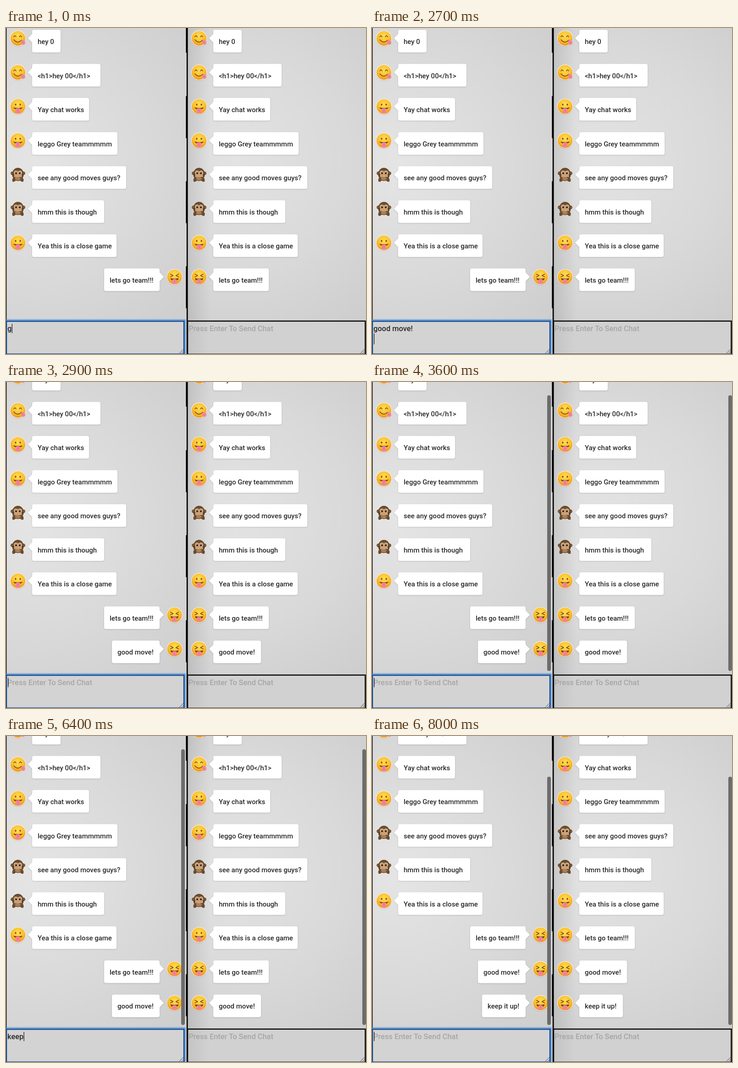
These frames come from a looping animation (785 px wide and 713 px high, 8.1 s). An HTML page:

```html
<!DOCTYPE html>
<html lang="en">
<head>
<meta charset="utf-8">
<title>Team chat</title>
<style>
  html, body { margin: 0; width: 100%; height: 100%; overflow: hidden; background: #d4d4d4; }
  svg { display: block; }
  text { font: 500 15px Roboto, sans-serif; fill: #2a2a2a; white-space: pre; }
  .field { font-size: 16.4px; }
  .hint { fill: #a6a6a6; }
  .bubble { fill: #fff; filter: drop-shadow(0 1px 1.5px rgba(0, 0, 0, .16)); }
  .bar { fill: #6c6c6c; }
  .line { fill: none; stroke: #6b3d0c; stroke-width: 1.4; stroke-linecap: round; stroke-linejoin: round; }
</style>
</head>
<body>
<svg width="785" height="713" viewBox="0 0 785 713">
  <defs>
    <radialGradient id="leftLight" gradientUnits="userSpaceOnUse" cx="60" cy="300" r="470">
      <stop offset="0" stop-color="#e5e5e5"/><stop offset=".55" stop-color="#d9d9d9"/><stop offset="1" stop-color="#cecece"/>
    </radialGradient>
    <radialGradient id="rightLight" gradientUnits="userSpaceOnUse" cx="500" cy="290" r="450">
      <stop offset="0" stop-color="#e3e3e3"/><stop offset=".55" stop-color="#d9d9d9"/><stop offset="1" stop-color="#cdcdcd"/>
    </radialGradient>
    <linearGradient id="edgeShade">
      <stop offset="0" stop-color="#000" stop-opacity=".1"/><stop offset="1" stop-color="#000" stop-opacity="0"/>
    </linearGradient>
    <radialGradient id="skin" cx=".5" cy=".35" r=".65">
      <stop offset="0" stop-color="#ffdc55"/><stop offset=".6" stop-color="#fcc02e"/><stop offset="1" stop-color="#ec9220"/>
    </radialGradient>
    <radialGradient id="fur" cx=".5" cy=".35" r=".65">
      <stop offset="0" stop-color="#7f5a37"/><stop offset="1" stop-color="#4d341f"/>
    </radialGradient>
    <filter id="glow" x="-5%" y="-20%" width="110%" height="140%"><feGaussianBlur stdDeviation=".8"/></filter>

    <g id="face">
      <circle cy="1" r="17.4" fill="#000" opacity=".12"/>
      <circle r="17.2" fill="#f6f1e6"/>
      <circle r="16" fill="url(#skin)"/>
    </g>
    <g id="yum">
      <use href="#face"/>
      <path class="line" d="M-9-3q2.500-5 5 0M3-3q2.500-5 5 0M-9 3q8 10 17 1"/>
      <path d="M7 5q5-3 8 1q3 6-2 8q-5 1-6-4z" fill="#f08a98"/>
      <path d="M9 7l3 4" stroke="#d95777"/>
    </g>
    <g id="tongue">
      <use href="#face"/>
      <ellipse cx="-5" cy="-4" rx="1.400" ry="2" fill="#6b3d0c"/>
      <ellipse cx="5" cy="-4" rx="1.400" ry="2" fill="#6b3d0c"/>
      <path d="M-10 2q10 3 20 0q-2 5-10 5t-10-5z" fill="#6b3d0c"/>
      <path d="M-5 5q5-2 10 0v5q0 5-5 5t-5-5z" fill="#f5849b"/>
      <path d="M0 6v6" stroke="#dc6582"/>
    </g>
    <g id="squint">
      <use href="#face"/>
      <path class="line" d="M-9-6l6 3l-6 3M9-6l-6 3l6 3"/>
      <path d="M-9 3q9 2 18 0q-1 6-9 6t-9-6z" fill="#6b3d0c"/>
      <path d="M-5 6q5-3 10 0v5q0 4-5 4t-5-4z" fill="#f5849b"/>
      <path d="M0 7v5" stroke="#dc6582"/>
    </g>
    <g id="monkey">
      <circle cx="-12" cy="-3" r="3.800" fill="#6a4828"/><circle cx="12" cy="-3" r="3.800" fill="#6a4828"/>
      <circle cx="-12" cy="-3" r="1.800" fill="#b58a61"/><circle cx="12" cy="-3" r="1.800" fill="#b58a61"/>
      <ellipse cy="-1" rx="12.500" ry="14" fill="url(#fur)"/>
      <path d="M0-7q4-4 8-1q3 4 0 8q3 9-8 10q-11-1-8-10q-3-4 0-8q4-3 8 1z" fill="#c9a27a"/>
      <circle cx="-4" cy="-3" r="2" fill="#2c1b10"/><circle cx="4" cy="-3" r="2" fill="#2c1b10"/>
      <path d="M-12 15q-2-8 5-10l7 1l7-1q7 2 5 10q-4 2-7-2l-5 1l-5-1q-3 4-7 2z" fill="#6d4a2c"/>
      <path d="M-6 5l9 1l4 3l-6 4l-7-2z" fill="#a98058"/>
    </g>
    <path id="grip" d="M0 9l9-9M5 9l4-4" stroke="#444" fill="none"/>
  </defs>

  <rect width="394" height="713" fill="url(#leftLight)"/>
  <rect x="396" width="389" height="713" fill="url(#rightLight)"/>
  <rect x="396" width="50" height="713" fill="url(#edgeShade)"/>
  <rect width="1.300" height="713"/>
  <rect x="392.500" width="1.500" height="713" fill="#e2e2e2"/>
  <rect x="393.700" width="2.800" height="713"/>
  <g id="notches"></g>

  <g id="log"></g>
  <rect class="bar" x="382" width="8" rx="4"/>
  <rect class="bar" x="777" width="8" rx="4"/>

  <rect x="-2" y="639.200" width="392" height="78" fill="none" stroke="#4a8fdb" stroke-width="3" filter="url(#glow)"/>
  <rect x="1" y="641.500" width="387" height="71.500" fill="#d3d3d3" stroke="#0e4288" stroke-width="2.200"/>
  <rect x="396" y="641" width="387.500" height="72.500" fill="#d1d1d1" stroke="#000" stroke-width="2.400"/>
  <rect x="397.500" y="642.500" width="46" height="69" fill="url(#edgeShade)" opacity=".6"/>
  <use href="#grip" x="378" y="702.500"/>
  <use href="#grip" x="773" y="702.500"/>
  <text class="field hint" id="hint" x="3" y="663">Press Enter To Send Chat</text>
  <text class="field hint" x="398" y="663">Press Enter To Send Chat</text>
  <text class="field" id="typed" x="3" y="663"></text>
  <rect id="caret" width="1.200" fill="#111"/>
  <g id="pointer" fill="none" stroke-linecap="round">
    <path id="beam" d="M-4-9q4 0 4 3q0-3 4-3M0-6V6M-4 9q4 0 4-3q0 3 4 3M-2 3h4"/>
  </g>
</svg>
<script>
  const LOOP = 8100, STEP = 100, PITCH = 74.55;
  const SENT = [2800, 7900], BAR_SHOWN = 3000;
  const messages = [
    ["yum", "hey 0", 62],
    ["yum", "<h1>hey 00</h1>", 149],
    ["tongue", "Yay chat works", 124],
    ["tongue", "leggo Grey teammmmm", 186],
    ["monkey", "see any good moves guys?", 205],
    ["monkey", "hmm this is though", 157],
    ["tongue", "Yea this is a close game", 184],
    ["squint", "lets go team!!!", 121, true],
    ["squint", "good move!", 104, true],
    ["squint", "keep it up!", 95, true]
  ];
  const drafts = [
    { text: "good move!", start: 0, key: 265, enter: 2600 },
    { text: "keep it up!", start: 5900, key: 150, enter: 7700 }
  ];

  const $ = id => document.getElementById(id);
  const set = (node, attrs) => {
    for (const name in attrs) node.setAttribute(name, attrs[name]);
  };
  const add = (parent, tag, attrs) => {
    const node = document.createElementNS(parent.namespaceURI, tag);
    set(node, attrs);
    return parent.appendChild(node);
  };
  const show = (node, on) => { node.style.display = on ? "" : "none"; };

  function addMessage(row, [emoji, words, width], offset, mine) {
    const left = mine ? 335 - width : 57 + offset;
    const edge = mine ? 335 : left;
    const tip = mine ? 9 : -9;
    add(row, "path", {
      class: "bubble",
      d: `M${left + 4} 0h${width - 8}q4 0 4 4v41.500q0 4-4 4h${8 - width}q-4 0-4-4v-41.500q0-4 4-4z` +
         `M${edge} 9l${tip} 9.500l${-tip} 9.500z`
    });
    add(row, "text", { x: left + 12, y: 31 }).textContent = words;
    add(row, "use", { href: "#" + emoji, x: mine ? 367.5 : 26 + offset, y: 18.5 });
  }

  const rows = messages.map((message, i) => {
    const row = add($("log"), "g", { transform: `translate(0 ${4 + i * PITCH})` });
    addMessage(row, message, 0, message[3]);
    addMessage(row, message, 395);
    return row;
  });
  for (const y of [-38, 149, 335, 521])
    add($("notches"), "rect", { x: 392.3, y, width: 2, height: 92 });

  // Dark stem over a pale outline keeps the text pointer readable.
  set($("beam"), { stroke: "#fff", "stroke-width": 3.2 });
  add($("pointer"), "path", { d: $("beam").getAttribute("d"), stroke: "#000", "stroke-width": 1.5 });

  const bars = document.querySelectorAll(".bar");
  const typed = $("typed"), caret = $("caret"), pointer = $("pointer");

  function draw(time) {
    const sent = SENT.filter(at => time >= at).length;
    $("log").setAttribute("transform", `translate(0 ${[0, -35, -109.5][sent]})`);
    rows.forEach((row, i) => show(row, i < 8 + sent));

    const top = sent === 2 ? 89 : 29;
    bars.forEach(bar => {
      set(bar, { y: top, height: 632 - top });
      show(bar, time >= BAR_SHOWN);
    });

    const draft = drafts.find((d, i) => time >= d.start && time < SENT[i]);
    const count = draft ? 1 + Math.floor((time - draft.start) / draft.key) : 0;
    const words = draft ? draft.text.slice(0, count) : "";
    const newline = draft && time >= draft.enter;
    typed.textContent = words;
    show($("hint"), !draft);
    const width = words ? typed.getComputedTextLength() : 0;
    set(caret, newline || !words
      ? { x: 4, y: newline ? 668 : 647, height: newline ? 24 : 20.5 }
      : { x: 3.3 + width, y: 647, height: 20.5 });

    const glide = Math.min(1, (time - 4400) / 500);
    const ease = 1 - (1 - glide) ** 2;
    show(pointer, time >= 4400 && time < 5900);
    pointer.setAttribute("transform", `translate(${4 + 21 * ease} ${690 - 37 * ease})`);
  }

  const begin = performance.now();
  function tick() {
    const time = (performance.now() - begin) % LOOP;
    draw(Math.floor(time / STEP) * STEP);
    requestAnimationFrame(tick);
  }
  tick();
</script>
</body>
</html>
```
